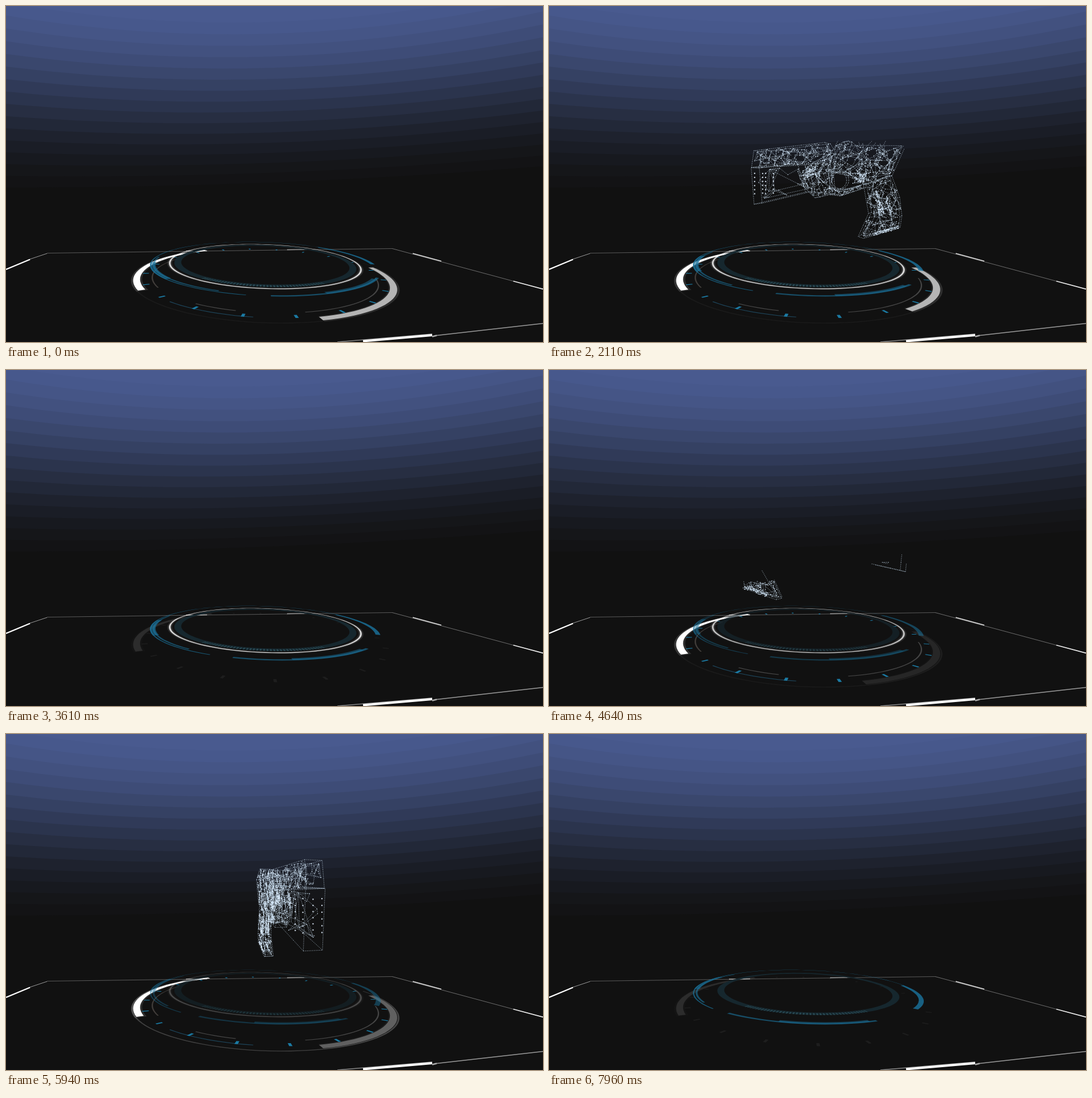
An HTML page with a canvas that plays this animation: 940x588 px, repeating every 8 s.

```html
<!DOCTYPE html>
<html>
<head>
<meta charset="utf-8">
<style>
  html, body { margin: 0; width: 100%; height: 100%; overflow: hidden; background: #111; }
  canvas { display: block; }
</style>
</head>
<body>
<canvas id="stage" width="940" height="588"></canvas>
<script>
const ctx = document.getElementById('stage').getContext('2d');
const LOOP = 8000, RAD = Math.PI / 180;
const FLOOR = [465, 0.262], RAISED = [445.5, 0.222];   // centre y, depth slope

const ramp = (t, from, to) => Math.min(1, Math.max(0, (t - from) / (to - from)));

let seed = 11;
function rnd() {
  seed = (seed * 16807) % 2147483647;
  return seed / 2147483647;
}

// ---------- backdrop ----------
function shade(y) {
  const v = 0.5 + 0.5 * Math.cos(Math.PI * Math.min(1, y / 340));
  return `rgb(${17 + 56 * v},${17 + 74 * v},${17 + 127 * v})`;
}

function backdrop() {
  ctx.globalAlpha = 1;
  ctx.fillStyle = '#111';
  ctx.fillRect(0, 0, 940, 588);
  for (let i = 16; i > 0; i--) {
    const yc = 8 + 20.8 * i - 0.12 * i * i, f = i / 16;
    const tilt = -7 - 10 * f * f, bow = -52 + 42.5 * f;
    ctx.fillStyle = shade(yc - 9);
    ctx.beginPath();
    ctx.moveTo(0, 0);
    for (let x = 0; x <= 940; x += 20) {
      const u = (x - 430) / 470;
      ctx.lineTo(x, yc + tilt * u + bow * u * u);
    }
    ctx.lineTo(940, 0);
    ctx.fill();
  }
}

function line(x0, y0, x1, y1, width, color) {
  ctx.strokeStyle = color;
  ctx.lineWidth = width;
  ctx.beginPath();
  ctx.moveTo(x0, y0);
  ctx.lineTo(x1, y1);
  ctx.stroke();
}

function floorEdge() {
  line(0, 461, 42, 443.5, 2.2, '#fff');
  line(42, 443, 72, 433, 1, '#999');
  line(72, 432.5, 676, 424.5, 0.9, '#626262');
  line(315, 429, 352, 428.5, 1.3, '#aaa');
  line(492, 426.5, 522, 426.2, 1.3, '#999');
  line(676, 424.5, 888, 481.5, 0.9, '#777');
  line(712, 433, 762, 446.5, 1.4, '#ddd');
  line(888, 481.5, 940, 495.5, 1.7, '#eee');
  line(580, 588, 746, 574, 1.5, '#888');
  line(625, 586.5, 746, 576, 4, '#fff');
  line(746, 578.5, 754, 576.5, 2.5, '#aaa');
  line(754, 576.5, 940, 555.5, 1.7, '#9a9a9a');
}

// ---------- projector rings ----------
function ringPoint(q, deg, [y0, slope]) {
  const c = Math.cos(deg * RAD) * q, s = Math.sin(deg * RAD) * q, d = 1 - s / 600;
  return [454 + c / d, y0 + (slope * s + 0.035 * c) / d];
}

function band(q0, q1, from, to, plane, color, alpha) {
  if (alpha <= 0) return;
  const n = Math.ceil((to - from) / 3), step = (to - from) / n;
  ctx.globalAlpha = alpha;
  ctx.fillStyle = color;
  ctx.beginPath();
  for (let i = 0; i <= n; i++) ctx.lineTo(...ringPoint(q1, from + i * step, plane));
  for (let i = n; i >= 0; i--) ctx.lineTo(...ringPoint(q0, from + i * step, plane));
  ctx.fill();
}

function outerRings(t) {
  const first = t < 3600;
  const on = first ? 1 - ramp(t, 3350, 3560) : ramp(t, 3660, 4200) * (1 - ramp(t, 7300, 7680));
  const show = 0.1 + 0.9 * on;
  const wave = first ? Math.sin(Math.PI * ramp(t, 0, 2110)) ** 2 : ramp(t, 4900, 6700);
  const grey = on * (first ? 0.7 - 0.24 * wave : 0.46 * ramp(t, 4200, 6700));
  const rim = on * (0.05 + 0.34 * wave);
  const turn = -4 * (1 - wave) * on;
  const start = 72 - (first ? 19 * ramp(t, 1040, 2110) : 0);
  const tick = 79.5 + Math.max(3.7 * wave, 8 * (1 - show));

  const arc = (q0, q1, from, to, color, alpha) => band(q0, q1, from, to, FLOOR, color, alpha);
  arc(216.5, 218.5, -25, 205, '#ccc', rim);
  arc(203, 219, 148 + turn, 225 + turn, '#fff', 0.12 * show);
  arc(206, 216, 149 + turn, 235 + turn, '#fff', show);
  arc(203, 219, -14, start, '#ccc', 0.16 * grey);
  arc(205, 215.5, -16, start, '#f2f2f2', grey);

  arc(187, 189, 145, 205, '#8a7f78', 0.4 * on);
  arc(187, 189, 101, 118, '#9a9a9a', 0.42 * on);
  arc(187, 189, 5, 75, '#9a9a9a', 0.38 * on);
  arc(202, 203.8, 94, 127, '#2a7aa5', 0.5 * on);

  for (let a = tick; a < tick + 360; a += 18)
    arc(195, 204, a - 0.55, a + 0.55, on ? '#1d8dbd' : '#aaa', 0.85 * show);
}

function innerRings(t) {
  const white = 0.8 * (1 - ramp(t, 4400, 6500));
  const glow = Math.max(1 - ramp(t, 4400, 5100), ramp(t, 5450, 6300));
  const turn = 14 * ramp(t, 1040, 2110) + 21 * ramp(t, 4400, 6700);

  band(143, 154, 0, 360, RAISED, '#16272e', glow);
  for (let a = 58; a < 125; a += 1.7)
    band(146, 154, a, a + 0.7, RAISED, '#37626e', 0.65 * glow);

  const arc = (q0, q1, from, to, alpha) =>
    band(q0, q1, from + turn, to + turn, RAISED, '#1b759f', alpha * glow);
  arc(189.5, 191.5, 97, 200, 0.7);
  arc(184.5, 187.5, 108, 180, 0.6);
  arc(183, 191.5, 135, 168, 0.6);
  arc(187, 191.5, 28, 88, 0.6);
  arc(183, 190, 31, 66, 0.5);
  arc(190, 191.5, 200, 308, 0.8);
  arc(184, 191.5, 308, 360, 0.8);

  band(157.5, 165, 0, 360, RAISED, '#fff', 0.15 * white);
  band(159.8, 162.6, 0, 360, RAISED, '#fff', white);
}

// ---------- wireframe model ----------
const FOCUS = 480, SIDE = 25 * RAD;   // camera distance, yaw of the side view

// Turns a position in the side view into model space, z across the body.
function place(sx, sy, z) {
  const X = sx - 497, k = Math.sin(SIDE) / FOCUS, x = X / (Math.cos(SIDE) + k * X);
  return [x, (300 - sy) * (1 - k * x), z];
}

const edges = [], studs = [];
// Each edge keeps the height at which the sweep reaches it.
const height = p => p[1] + 0.15 * p[0];
function edge(a, b) {
  edges.push([a, b, (height(a) + height(b)) / 2 + (rnd() - 0.5) * 8]);
}

// Joins every vertex to its two nearest predecessors.
function mesh(n, sample) {
  const pts = Array.from({ length: n }, sample);
  pts.forEach((p, i) => {
    const dist = q => Math.hypot(p[0] - q[0], p[1] - q[1], p[2] - q[2]);
    pts.slice(0, i).sort((a, b) => dist(a) - dist(b)).slice(0, 2).forEach(q => edge(p, q));
    if (rnd() < 0.7) studs.push([p, 1]);
  });
}

const side = w => (rnd() < 0.5 ? -1 : 1) * w * (0.8 + 0.2 * rnd());

// Outline on both sides plus a random mesh inside it.
function part(w, n, ...pts) {
  const path = new Path2D();
  pts.forEach(([x, y], i) => {
    path.lineTo(x, y);
    const [u, v] = pts[(i + 1) % pts.length];
    const steps = Math.ceil(Math.hypot(u - x, v - y) / 14);
    for (const z of [-w, w])
      for (let k = 0; k < steps; k++) {
        const at = f => place(x + (u - x) * f, y + (v - y) * f, z);
        edge(at(k / steps), at((k + 1) / steps));
      }
    edge(place(x, y, -w), place(x, y, w));
  });
  mesh(n, () => {
    let x, y;
    do {
      x = 350 + rnd() * 280;
      y = 210 + rnd() * 200;
    } while (!ctx.isPointInPath(path, x, y));
    return place(x, y, side(w));
  });
}

// Dense bright detail around a segment.
function detail(w, n, r, x0, y0, x1, y1) {
  mesh(n, () => {
    const f = rnd(), x = x0 + (x1 - x0) * f, y = y0 + (y1 - y0) * f;
    return place(x + (rnd() * 2 - 1) * r, y + (rnd() * 2 - 1) * r, side(w));
  });
}

part(12, 26, [361, 283], [440, 272], [455, 325], [366, 346]);                           // barrel
part(11, 170, [365, 254], [488, 240], [498, 258], [466, 276], [361, 283]);              // rail
part(10, 130, [466, 275], [498, 258], [494, 296], [497, 328], [470, 335], [446, 312]);  // pump
part(10, 380, [496, 262], [510, 237], [583, 219], [625, 237], [598, 297], [556, 312], [524, 296], [492, 290]);
part(8, 210, [553, 312], [598, 297], [612, 335], [616, 368], [613, 388], [553, 405], [544, 402], [562, 362]);
part(5, 30, [492, 318], [510, 325], [552, 311], [553, 318], [511, 332], [494, 330]);    // guard
detail(10, 130, 7, 450, 300, 462, 279);
detail(8, 70, 9, 540, 302, 554, 298);
detail(7, 110, 3, 572, 324, 583, 366);
detail(6, 40, 2, 592, 334, 598, 364);
detail(7, 60, 3, 570, 399, 612, 387);

const hole = (deg, z) => place(508 + 15 * Math.cos(deg * RAD), 305 + 15 * Math.sin(deg * RAD), z);
for (const z of [-5, 5])
  for (let a = 0; a < 360; a += 18) edge(hole(a, z), hole(a + 18, z));
for (const z of [-12, 12])
  for (let y = 293; y < 332; y += 7) studs.push([place(367, y, z), 2.2], [place(386, y, z), 2.2]);

// Height of the sweep: rises at a steady rate, sinks with an ease-out.
function sweep(t) {
  const [from, to, fall] = t < 4000 ? [1000, 3550, 900] : [4430, 7650, 1500];
  if (t < from || t > to) return -Infinity;
  const rise = -86 + 0.135 * (t - from);
  const sink = -86 + 190 * ramp(to - t, 0, fall) ** 2;
  return Math.min(rise, sink);
}

function model(t) {
  const cut = sweep(t);
  if (cut === -Infinity) return;
  const a = SIDE + 0.06 * (t - 2110) * RAD, c = Math.cos(a), s = Math.sin(a);
  const project = ([x, y, z]) => {
    const d = 1 - (x * s + z * c) / FOCUS;
    return [478 + 21 * c + (x * c - z * s) / d, 300 - y / d];
  };
  ctx.globalAlpha = 0.72;
  ctx.strokeStyle = '#d2e8fb';
  ctx.lineWidth = 0.8;
  ctx.setLineDash([1.6, 1.5]);
  ctx.beginPath();
  for (const [p, q, h] of edges) {
    if (h > cut) continue;
    ctx.moveTo(...project(p));
    ctx.lineTo(...project(q));
  }
  ctx.stroke();
  ctx.setLineDash([]);
  ctx.globalAlpha = 0.85;
  ctx.fillStyle = '#e4f1ff';
  for (const [p, size] of studs) {
    if (height(p) > cut) continue;
    const [x, y] = project(p);
    ctx.fillRect(x - size / 2, y - size / 2, size, size);
  }
}

function draw(now) {
  const t = now % LOOP;
  backdrop();
  floorEdge();
  outerRings(t);
  innerRings(t);
  model(t);
  requestAnimationFrame(draw);
}
requestAnimationFrame(draw);
</script>
</body>
</html>
```
